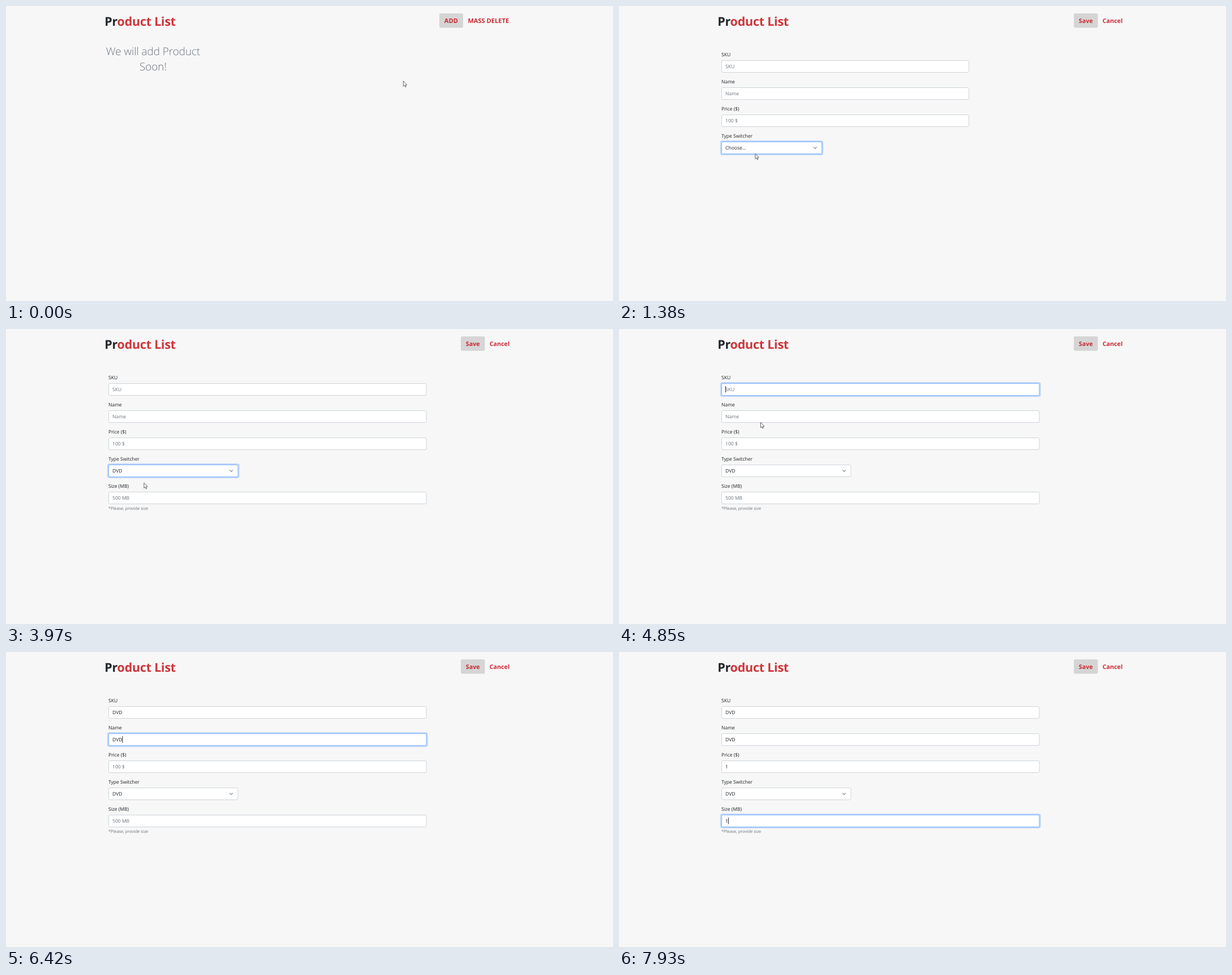
Recreate the animation shown at these times as an HTML page. Size 1073 by 522 pixels, loop 8000 ms.

```html
<!DOCTYPE html>
<html lang="en">
<head>
<meta charset="utf-8">
<title>Product List</title>
<style>
  html, body { margin: 0; width: 100%; height: 100%; overflow: hidden; background: #f7f7f7; }
  svg { display: block; width: 100%; height: 100%; }
  text {
    font: 8.6px "Open Sans", "Noto Sans", sans-serif;
    fill: #212529; letter-spacing: -.005em;
    text-rendering: geometricPrecision; white-space: pre;
  }
  .title { font-size: 21.5px; font-weight: 700; letter-spacing: -.011em; }
  .red { fill: #cd363b; }
  .lead { font-size: 19px; font-weight: 300; text-anchor: middle; fill: #6c757d; }
  .button { font-size: 10.7px; font-weight: 700; fill: #cb2a33; letter-spacing: 0; }
  .caps { font-size: 11.1px; }
  .hint { font-size: 7.4px; }
  .hint, .empty { fill: #6c757d; }
  .fill { fill: #d5d5d5; }
  .ring { fill: #0d6efd; }
  .box { fill: #fff; }
  .chevron { fill: none; stroke: #343a40; stroke-width: 1; stroke-linecap: round; stroke-linejoin: round; }
  .caret { stroke: #212529; stroke-width: 1; }
  .pointer { fill: #fff; stroke: #3c3f4a; stroke-width: .8; stroke-linejoin: round; }
</style>
</head>
<body>
<svg id="stage" viewBox="0 0 1073 522"></svg>
<script>
const LOOP = 8000, FADE = 150;
const LEFT = 181.5, TOP = 96.5, ROW = 48, TIGHT = 39, HEIGHT = 21;
const SKU = 0, NAME = 1, PRICE = 2, TYPE = 3, EXTRA = 4;

const types = {
  "Choose...": { fields: [] },
  DVD: { fields: [["Size (MB)", "500 MB"]], hint: "*Please, provide size" },
  Book: { fields: [["Weight (KG)", "1 KG"]], hint: "*Please, provide weight" },
  Furniture: {
    fields: [["Height (CM)", "100 CM"], ["Width (CM)", "100 CM"], ["Length (CM)", "100 CM"]],
    hint: "*Please, provide dimensions"
  }
};

// Step tables: [start time, value]
const page = [[0, "list"], [740, "form"]];
const chosen = [[0, "Choose..."], [1790, "DVD"], [2500, "Book"], [3160, "Furniture"], [3970, "DVD"]];
const focus = [[0, -1], [1210, TYPE], [4480, SKU], [5210, NAME], [6820, PRICE], [7600, TYPE], [7680, EXTRA]];
const typed = {
  [SKU]: [[0, ""], [4930, "D"], [5010, "DV"], [5090, "DVD"]],
  [NAME]: [[0, ""], [6200, "D"], [6350, "DV"], [6420, "DVD"]],
  [PRICE]: [[0, ""], [7300, "1"]],
  [EXTRA]: [[0, ""], [7920, "1"]]
};
const caretOn = [[0, false], [4560, true], [5210, false], [5960, true], [7600, false], [7690, true]];
const pointerOn = [[0, true], [4930, false], [6680, true], [6760, false]];

// Pointer path: [time, x, y]
const path = [
  [0, 702, 132.5], [110, 702, 132.5], [420, 788, 24], [700, 788, 24],
  [1180, 244, 254], [1380, 240.5, 261], [1790, 240.5, 261],
  [2100, 250, 250], [2440, 250, 250], [2670, 244, 251], [2840, 244, 251], [2930, 243, 260],
  [3160, 243, 260], [3480, 260, 248], [3640, 260, 248], [3730, 254, 260],
  [3969, 254, 260], [3970, 243.5, 272], [4050, 243.5, 272], [4120, 244, 215],
  [4270, 244, 215], [4450, 250, 106], [4680, 250, 106], [4850, 250, 165],
  [6679, 250, 165], [6680, 228, 216]
];

const stage = document.getElementById("stage");

function add(parent, tag, attrs = {}, content = "") {
  const node = document.createElementNS("http://www.w3.org/2000/svg", tag);
  set(node, attrs);
  node.textContent = content;
  return parent.appendChild(node);
}
function set(node, attrs) {
  for (const key in attrs) node.setAttribute(key, attrs[key]);
}
function show(node, on) {
  node.setAttribute("visibility", on ? "inherit" : "hidden");
}
const group = parent => add(parent, "g");
const label = (parent, x, y, content, cls = "") => add(parent, "text", { x, y, class: cls }, content);

function valueAt(steps, t) {
  let value = steps[0][1];
  for (const [start, next] of steps) if (t >= start) value = next;
  return value;
}

function pointAt(t) {
  const i = path.findIndex(p => p[0] > t);
  if (i < 0) return path[path.length - 1].slice(1);
  const [t0, x0, y0] = path[i - 1], [t1, x1, y1] = path[i];
  const k = (t - t0) / (t1 - t0);
  return [x0 + (x1 - x0) * k, y0 + (y1 - y0) * k];
}

function focusLevel(id, t) {
  let level = 0, last = 0, goal = 0;
  const advance = until => {
    const d = (until - last) / FADE;
    level = goal ? Math.min(1, level + d) : Math.max(0, level - d);
    last = until;
  };
  for (const [start, target] of focus) {
    if (start > t) break;
    advance(start);
    goal = target === id ? 1 : 0;
  }
  advance(t);
  return level;
}

function mix(a, b, k) {
  return `rgb(${a.map((v, i) => Math.round(v + (b[i] - v) * k))})`;
}

function makeField(parent, id, top, name, placeholder) {
  const g = group(parent);
  label(g, 181, top - 8, name);
  const ring = add(g, "rect", { class: "ring", x: LEFT - 2.6, y: top - 2.6, height: HEIGHT + 5.2, rx: 4 });
  const box = add(g, "rect", { class: "box", x: LEFT, y: top, height: HEIGHT, rx: 2.3 });
  const text = label(g, 188.1, top + 13.6, placeholder);
  const caret = add(g, "path", { class: "caret" });
  const chevron = id === TYPE && add(g, "path", { class: "chevron" });

  return (t, width) => {
    const level = focusLevel(id, t);
    set(ring, { width: width + 5.2, "fill-opacity": .25 * level });
    set(box, { width, stroke: mix([206, 212, 218], [134, 183, 254], level) });
    const value = id === TYPE ? valueAt(chosen, t) : typed[id] ? valueAt(typed[id], t) : "";
    text.textContent = value || placeholder;
    text.setAttribute("class", value ? "" : "empty");
    if (chevron) set(chevron, { d: `M${LEFT + width - 14.4} ${top + 9.3}l2.55 2.55 2.55-2.55` });
    const blink = id !== TYPE && valueAt(focus, t) === id && valueAt(caretOn, t);
    show(caret, blink);
    if (blink) {
      const x = 188.5 + (value ? text.getComputedTextLength() : 0);
      set(caret, { d: `M${x} ${top + 4.5}v11.5` });
    }
  };
}

const title = label(stage, 174.2, 34.8, "", "title");
add(title, "tspan", {}, "Pr");
add(title, "tspan", { class: "red" }, "oduct List");

const list = group(stage);
add(list, "rect", { class: "fill", x: 766, y: 13, width: 42, height: 25.6, rx: 2.8 });
label(list, 774.8, 30.2, "ADD", "button caps");
label(list, 816.4, 30.2, "MASS DELETE", "button caps");
label(list, 260, 87.2, "We will add Product", "lead");
label(list, 260, 114.2, "Soon!", "lead");

const form = group(stage);
add(form, "rect", { class: "fill", x: 804, y: 13, width: 42.5, height: 25.6, rx: 2.8 });
label(form, 812.8, 30.3, "Save", "button");
label(form, 854.8, 30.3, "Cancel", "button");

const fields = [["SKU", "SKU"], ["Name", "Name"], ["Price ($)", "100 $"], ["Type Switcher", ""]]
  .map(([name, hint], i) => makeField(form, i, TOP + ROW * i, name, hint));

const panels = Object.entries(types).map(([type, { fields, hint }]) => {
  const g = group(form), top = TOP + ROW * EXTRA;
  const draw = fields.map(([name, placeholder], i) =>
    makeField(g, type === "DVD" ? EXTRA : EXTRA + 1 + i, top + TIGHT * i, name, placeholder));
  if (hint) label(g, 181, top + 31.2 + TIGHT * (fields.length - 1), hint, "hint");
  return { type, g, draw };
});

const pointer = add(stage, "path", { class: "pointer", d: "M.4 .4v9.2l2.1-1.9 1.4 3.2 1.5-.7-1.4-3.1h2.8z" });

function render(t) {
  const onForm = valueAt(page, t) === "form";
  const type = valueAt(chosen, t);
  const wide = type !== "Choose...";
  show(list, !onForm);
  show(form, onForm);
  fields.forEach((draw, i) => {
    const width = i === TYPE ? (wide ? 228.5 : 177) : (wide ? 561.5 : 437);
    draw(t, width);
  });
  for (const panel of panels) {
    show(panel.g, onForm && panel.type === type);
    if (panel.type === type) panel.draw.forEach(draw => draw(t, 561.5));
    else panel.g.querySelectorAll(".caret").forEach(c => show(c, false));
  }
  const [x, y] = pointAt(t);
  set(pointer, { transform: `translate(${x} ${y})` });
  show(pointer, valueAt(pointerOn, t));
}

const begin = performance.now();
function tick() {
  render((performance.now() - begin) % LOOP);
  requestAnimationFrame(tick);
}
tick();
</script>
</body>
</html>
```
